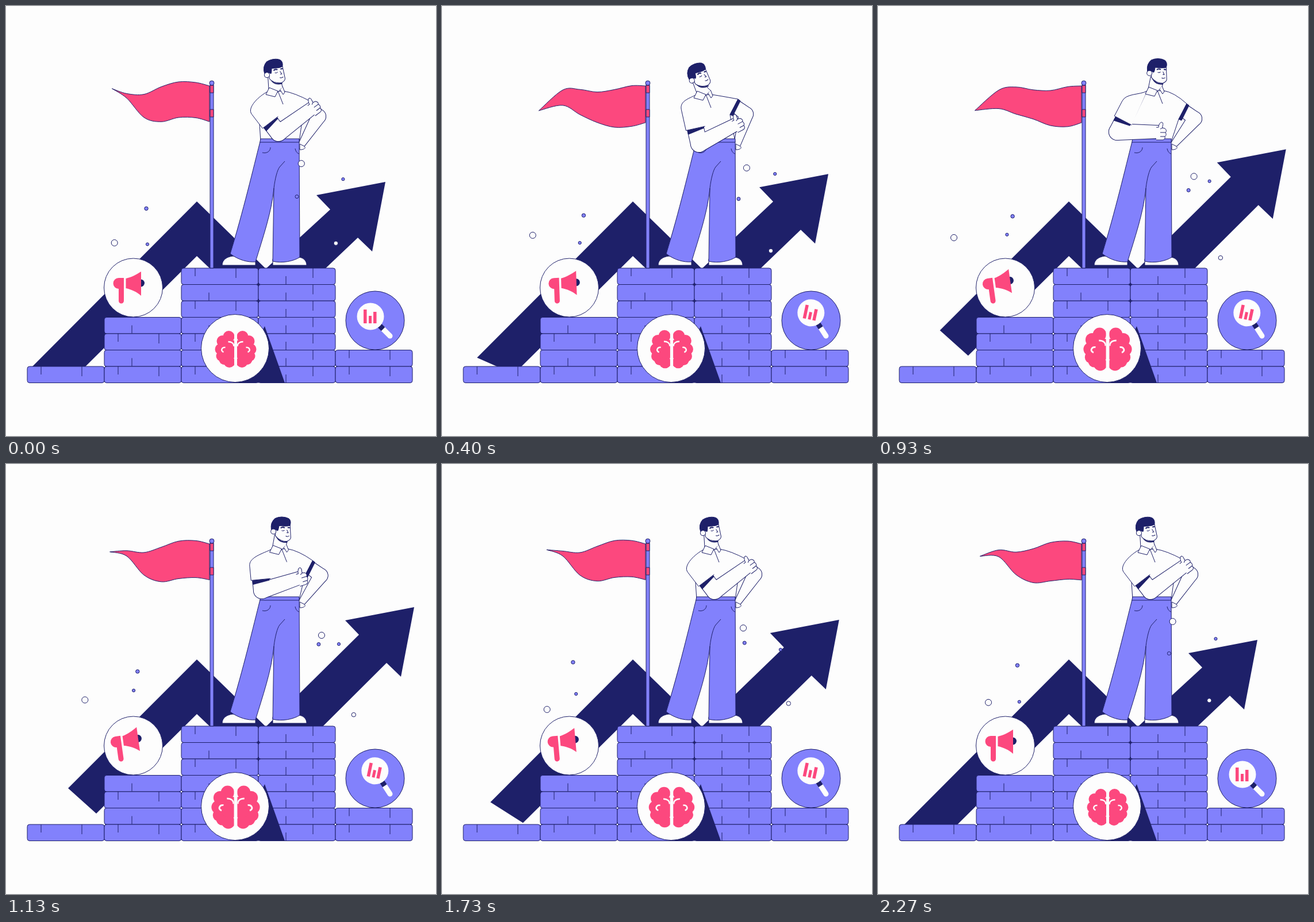
Animation of 748x748 px, one loop 2.34 s. Source, as an HTML page with a canvas:

```html
<!DOCTYPE html>
<html lang="en">
<head>
<meta charset="utf-8">
<title>Podium</title>
<style>
  html, body { margin: 0; width: 100%; height: 100%; overflow: hidden; background: #fdfdfd; }
  canvas { display: block; }
</style>
</head>
<body>
<canvas id="stage" width="748" height="748"></canvas>
<script>
const ctx = document.getElementById('stage').getContext('2d');
const NAVY = '#1e2069', PURPLE = '#8281fc', PINK = '#fc487e', WHITE = '#fdfdfd';
const LOOP = 2340, STEP = 1000 / 15;

const smooth = (t, from, to) => {
  const u = Math.max(0, Math.min(1, (t - from) / (to - from)));
  return u * u * (3 - 2 * u);
};
const pulse = (t, a, b, c, d) => smooth(t, a, b) - smooth(t, c, d);
// Cosine swing that is highest at the given share of its cycle.
const swing = (cycle, peak) => Math.cos(2 * Math.PI * (cycle - peak));
const along = (p, dir, k) => [p[0] + dir[0] * k, p[1] + dir[1] * k];

function draw(path, fill, line = NAVY, width = 1) {
  const p = typeof path === 'string' ? new Path2D(path) : path;
  if (fill) { ctx.fillStyle = fill; ctx.fill(p); }
  if (line) { ctx.strokeStyle = line; ctx.lineWidth = width; ctx.stroke(p); }
}
function circle(x, y, r, fill, line = null) {
  const p = new Path2D();
  p.arc(x, y, r, 0, 7);
  draw(p, fill, line);
}
function poly(points, fill) {
  draw('M' + points.join('L') + 'Z', fill, null);
}
function group(x, y, angle, scale, paint) {
  ctx.save();
  ctx.translate(x, y);
  ctx.rotate(angle);
  ctx.scale(scale, scale);
  paint();
  ctx.restore();
}
const rad = degrees => degrees * Math.PI / 180;

function drawArrow(grow) {
  const head = [[564, 354], [540, 329], [660, 306], [637, 427], [612, 403]]
    .map(([x, y]) => [x + 50 * grow, y - 57 * grow]);
  poly([[46 + 62 * grow, 627 - 63 * grow], [332, 340], [452, 457], ...head,
    [455, 552], [332, 435], [115 + 42 * grow, 650 - 42 * grow]], NAVY);
}

function drawBricks() {
  [1, 4, 7, 7, 2].forEach((count, col) => {
    const x = 37 + col * 134;
    for (let row = 7 - count; row < 7; row++) {
      const y = 456 + row * 28.5;
      const brick = new Path2D();
      brick.roundRect(x, y, 134, 28.5, 4);
      draw(brick, PURPLE);
      const low = `M${x + 48} ${y + 14}v14`;
      if (col === 3) draw(low + `M${x + 95} ${y}v17`);
      else if (row % 2 && col < 4) draw(low);
      else draw(`M${x + 24} ${y}v14M${x + 95} ${y}v17`);
    }
  });
}

function spline(points) {
  const p = i => points[Math.max(0, Math.min(points.length - 1, i))];
  const handle = (i, s) => [0, 1].map(k => p(i)[k] + s * (p(i + 1)[k] - p(i - 1)[k]) / 6);
  return points.slice(1).map((q, i) => `C${handle(i, 1)} ${handle(i + 1, -1)} ${q}`).join('');
}

// Edge knots of the waving cloth: x, mean y, swing, peak of the swing.
const FLAG_TOP = [[354, 139, 0, 0], [330, 137, 4, .5], [300, 139, 8, .58],
  [270, 140.5, 10, .75], [240, 146, 8, .95], [210, 150, 4, 1.15]];
const FLAG_BOTTOM = [[210, 171, 11, .46], [240, 191, 3, .05], [270, 196, 11, .83],
  [300, 198, 13, .7], [330, 201, 9, .62], [354, 202, 1, .6]];

function drawFlag(t) {
  const cycle = 4 * t / LOOP;
  const knots = edge => edge.map(([x, y, size, peak]) => [x, y + size * swing(cycle, peak)]);
  const wag = swing(cycle, .64), tip = [178 - 10 * wag, 159 + 24 * wag];
  const top = knots(FLAG_TOP), bottom = knots(FLAG_BOTTOM);
  draw(`M${top[0]}${spline([...top, tip])}${spline([tip, ...bottom])}Z`, PINK);
  draw('M355 137H361V456H355Z', PURPLE);
  draw('M355 138H361V151H355ZM355 180H361V193H355Z', PINK);
  circle(358, 134, 4, PURPLE, NAVY);
}

// Joints of each pose; tilt is the angle of the head in degrees.
const crossed = { neck: [470, 149], tilt: [-4], shoulder: [441, 178], elbow: [474, 221], hand: [536, 175], sleeve: [530, 166] };
const lowered = { neck: [456, 155], tilt: [-15], shoulder: [433, 177], elbow: [447, 240], hand: [515, 204], sleeve: [515, 162] };
const thumbUp = { neck: [464, 152], tilt: [-14], shoulder: [431, 180], elbow: [417, 232], hand: [490, 218], sleeve: [521, 160] };
const upright = { neck: [483, 148], tilt: [6], shoulder: [440, 173], elbow: [416, 219], hand: [492, 219], sleeve: [537, 170] };
const POSES = [[0, crossed], [400, lowered], [670, thumbUp], [930, upright],
  [1330, { ...crossed, tilt: [3] }], [1730, crossed], [2270, crossed]];

// Smooth periodic interpolation between the poses, without overshoot.
function poseAt(t) {
  const n = POSES.length;
  const when = i => POSES[(i + n) % n][0] + Math.floor(i / n) * LOOP;
  let i = n - 1;
  while (POSES[i][0] > t) i--;
  const span = when(i + 1) - when(i), u = (t - when(i)) / span, v = 1 - u;
  const blend = (name, k) => {
    const value = i => POSES[(i + n) % n][1][name][k];
    const slope = i => (value(i + 1) - value(i)) / (when(i + 1) - when(i));
    const tangent = i => {
      const a = slope(i - 1), b = slope(i);
      return a * b <= 0 ? 0 : 2 * a * b / (a + b);
    };
    return value(i) * v * v * (1 + 2 * u) + value(i + 1) * u * u * (3 - 2 * u) +
      span * u * v * (tangent(i) * v - tangent(i + 1) * u);
  };
  const pose = {};
  for (const name in crossed) pose[name] = crossed[name].map((_, k) => blend(name, k));
  return pose;
}

// Tapered limb between two round joints.
function limb(a, ra, b, rb) {
  const dx = b[0] - a[0], dy = b[1] - a[1];
  const angle = Math.atan2(dy, dx), open = Math.acos((ra - rb) / Math.hypot(dx, dy));
  const p = new Path2D();
  p.arc(...a, ra, angle + open, angle - open + 2 * Math.PI);
  p.arc(...b, rb, angle - open, angle + open);
  p.closePath();
  return p;
}
function drawJoined(paths) {
  paths.forEach(p => draw(p, null, NAVY, 2));
  paths.forEach(p => draw(p, WHITE, null));
}

function drawHead() {
  draw('M-9 11C-4 19 4 22 11 19L11 21C3 22 -4 21 -9 11Z', NAVY);
  draw('M-11 -8L-10 11C-4 18 5 20 11 19C15 17 17 15 17 12L14 -9Z', WHITE);
  circle(-14, 4, 4.5, WHITE, NAVY);
  draw('M-18 1C-20 -7 -19 -13 -13 -19C-7 -23 3 -24 10 -21C15 -18 15 -14 14 -9C8 -6 2 -7 -5 -7C-6 -3 -5 0 -7 2L-11 0C-13 -1 -16 -1 -18 1Z', NAVY);
  draw('M-2 -3C0 -5 3 -5 5 -4M10 -5L14 -5', null, NAVY, 2);
  draw('M0 1C2 2 4 1 5 0M9 -1L12 4L9 4M8 10C10 11 12 11 14 9');
}

function drawHand() {
  draw('M-8 -8L-4 -8C-4 -13 0 -19 3 -16C5 -13 2 -9 3 -7L7 -6C10 -4 10 0 8 1C10 4 9 7 7 8C8 11 6 14 3 14L-8 14', WHITE);
  draw('M3 -7L-1 -5M-1 1L8 1M-1 8L7 8');
}

function drawCollar() {
  draw('M-12 -7L-18 5L-2 9L3 -1ZM11 -9L15 1L12 5L7 -3', WHITE);
  draw('M3 -1L12 22');
}

function drawLegs() {
  draw('M376 451C376 441 385 436 395 435L434 442V451Z', WHITE);
  draw('M464 451V440L508 437C517 437 523 443 523 451Z', WHITE);
  draw('M466 317L464 444C480 448 500 444 511 437L510 231H443L441 240C432 275 412 360 390 431C405 442 420 446 434 445C446 405 462 360 466 317Z', PURPLE);
  draw('M442 237H510M466 317C468 300 472 285 476 280L485 270M460 246C460 253 453 257 446 255M503 248C504 254 508 257 510 257');
}

function drawBackArm(sleeve) {
  const elbow = along(sleeve, [14, 26], 1), hip = [513, 243];
  drawJoined([limb(along(sleeve, [-5, 12], 1), 11, elbow, 12), limb(elbow, 12, hip, 5)]);
  draw('M511 240L519 244C522 247 519 250 511 250Z', WHITE);
}

function drawTorso({ neck, sleeve }) {
  const [x, y] = neck, hem = along(sleeve, [-14, 27], 1);
  draw(`M443 236L441 205L${x - 15} ${y}L${x + 13} ${y - 1}Q${x + 32} ${y + 2} ${sleeve}L${hem}L510 236`, WHITE);
  draw(`M${sleeve}l4 3L${along(hem, [5, 2], 1)}L${hem}Z`, NAVY);
}

function drawNeckAndHead([x, y], tilt) {
  const hx = x + 34 * Math.sin(tilt), hy = y - 34 * Math.cos(tilt);
  draw(`M${hx - 12} ${hy + 8}L${x - 13} ${y - 4}L${x + 3} ${y + 1}L${x + 11} ${y - 8}L${hx + 11} ${hy + 16}`, WHITE);
  group(hx, hy, tilt, 1, drawHead);
  group(x, y, 0, 1, drawCollar);
}

function drawFrontArm({ neck, shoulder, elbow, hand }) {
  const dx = elbow[0] - shoulder[0], dy = elbow[1] - shoulder[1], length = Math.hypot(dx, dy);
  const down = [dx / length, dy / length], out = [-down[1], down[0]];
  const hem = along(shoulder, down, length * .57);
  const turn = Math.atan2(hand[1] - elbow[1], hand[0] - elbow[0]);
  const wrist = along(hand, [Math.cos(turn), Math.sin(turn)], -6);
  drawJoined([limb(hem, 14, elbow, 14), limb(elbow, 14, wrist, 11)]);

  const cuff = [along(hem, out, 15), along(hem, out, -15)];
  poly([...cuff, along(cuff[1], down, 3), along(cuff[0], down, 8)], NAVY);
  const start = [neck[0] - 15, neck[1]], side = along(shoulder, out, 17);
  draw(`M${start}C${along(start, [-14, 7], 1)} ${along(side, down, -15)} ${side}` +
    `L${along(hem, out, 17)}L${along(hem, out, -17)}`, WHITE);
  group(...hand, turn, 1, drawHand);
}

function drawMan(t) {
  const pose = poseAt(t);
  drawBackArm(pose.sleeve);
  drawTorso(pose);
  drawLegs();
  drawFrontArm(pose);
  drawNeckAndHead(pose.neck, rad(pose.tilt[0]));
}

function drawMegaphone(grow) {
  circle(221.5, 490, 51, WHITE, NAVY);
  group(200, 516, rad(-8 * grow), 1, () => {
    circle(34.5, -34, 6.5, NAVY);
    draw('M5 -43H-4A9.5 9.5 0 0 0 -4 -24V-3A4.5 4.5 0 0 0 5 -3Z', PINK, null);
    draw('M8.5 -42C18 -44 27 -49 35 -54V-12C27 -19 18 -23 8.5 -25Z', PINK, null);
  });
}

function drawMagnifier(t) {
  circle(642, 547, 51, PURPLE, NAVY);
  group(668, 574, rad(12 * pulse(t, 0, 390, 1740, 2250)), 1, () => {
    ctx.lineCap = 'round';
    draw('M-12 -12L0 0', null, WHITE, 9);
    ctx.lineCap = 'butt';
    draw('M-21 -21L-12 -12', null, NAVY, 9);
    circle(-34, -34, 23.5, WHITE);
    draw('M-46 -46h5.5v24h-5.5ZM-37 -35h5v13h-5ZM-29 -42h5.5v20h-5.5Z', PINK, null);
  });
}

const LOBES = [[12, -22, 10], [23, -14, 10], [26, 0, 10], [25, 12, 9], [20, 18, 9], [11, 22, 10], [8, 0, 16]];
function drawBrain(grow) {
  poly([[450, 557], [485, 655.5], [400, 655.5]], NAVY);
  circle(398.5, 595.5, 59, WHITE, NAVY);
  for (const side of [1, -1]) {
    group(399.5, 597, 0, 1 + .17 * grow, () => {
      ctx.scale(side, 1);
      ctx.beginPath();
      ctx.rect(2.5, -40, 50, 80);
      ctx.clip();
      for (const lobe of LOBES) circle(...lobe, PINK);
      draw('M13 -13C7 -13 3 -10 3 -5M18 -3C24 -4 27 3 21 5', null, WHITE, 2.4);
    });
  }
}

// Dots drift on ellipses: radius, colour, then centre, size and peak for x and for y.
const DOTS = [
  [5.5, WHITE, [531, 19, .43], [286, 12, .48]],
  [3, PURPLE, [525, 19, .5], [322, 14, .13]],
  [2.6, PURPLE, [583, 7, .83], [308, 16, .68]],
  [3.7, WHITE, [590, 20, .6], [424, 14, .4]],
  [5.5, WHITE, [164, 32, .89], [412, 15, .75]],
  [3.2, PURPLE, [236, 11, .12], [356, 12, .3]],
  [2.6, PURPLE, [234, 12, 0], [404, 11, .05]]
];
function drawDots(t) {
  const drift = ([centre, size, peak]) => centre + size * swing(t / LOOP, peak);
  for (const [r, fill, x, y] of DOTS) circle(drift(x), drift(y), r, fill, NAVY);
}

function render() {
  // The picture advances in 15 steps per second.
  const step = Math.min(34, Math.floor((performance.now() % LOOP + 4) / STEP));
  const t = Math.round(step * STEP / 10) * 10;
  const grow = pulse(t, 135, 965, 1350, 2250);
  ctx.fillStyle = WHITE;
  ctx.fillRect(0, 0, 748, 748);
  ctx.lineJoin = 'round';
  drawArrow(grow);
  drawBricks();
  drawMegaphone(grow);
  drawFlag(t);
  drawMan(t);
  drawBrain(grow);
  drawMagnifier(t);
  drawDots(t);
  requestAnimationFrame(render);
}
render();
</script>
</body>
</html>
```
